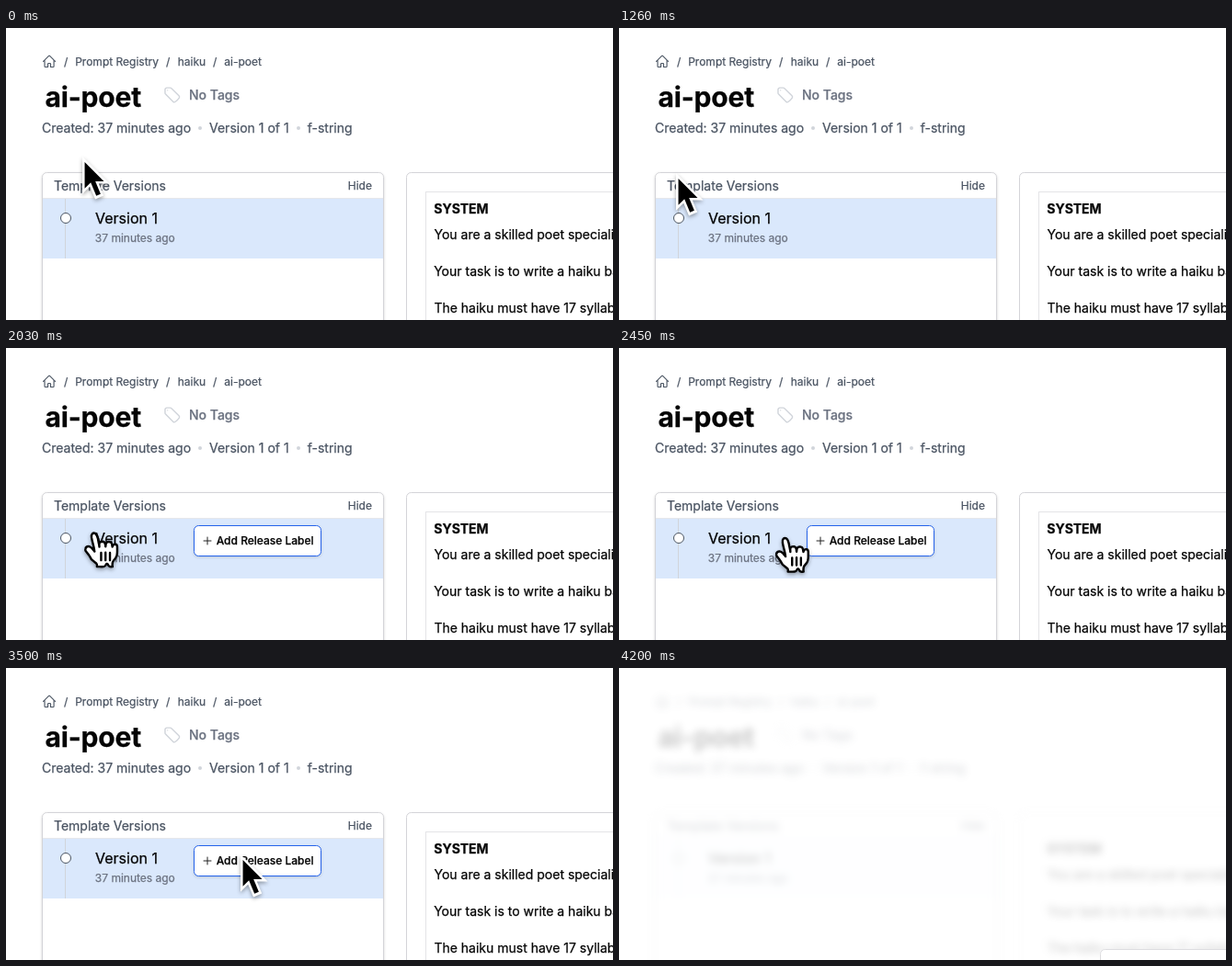
An HTML page for the animation above (4.41 s loop, 660 by 318 pixels).

```html
<!DOCTYPE html>
<html lang="en">
<head>
<meta charset="utf-8">
<title>Prompt Registry</title>
<style>
  html, body { margin: 0; width: 100%; height: 100%; overflow: hidden; background: #fff; }
  svg { display: block; width: 660px; height: 318px; font-family: Inter, sans-serif; }
  /* A hairline stroke gives the slightly heavier text rendering */
  text { white-space: pre; stroke-width: .25; }
  .small { font-size: 12px; fill: #4b5563; stroke: #4b5563; }
  .body { font-size: 14px; fill: #4b5563; stroke: #4b5563; }
  .muted { fill: #6b7280; stroke: #6b7280; }
  .dark { fill: #050505; stroke: #050505; }
  .medium { font-weight: 500; }
  .line { fill: none; stroke-linecap: round; stroke-linejoin: round; }
  .panel { fill: #fff; stroke: #d4d4d8; }
  .shadow { filter: drop-shadow(0 1px 1.5px rgb(0 0 0 / .16)); }
  #cursor { filter: drop-shadow(0 2px 2px rgb(0 0 0 / .35)); }
</style>
</head>
<body>
<svg viewBox="0 0 660 318">
  <g id="page">
    <path class="line" stroke="#4b5563" stroke-width="1.7" transform="translate(39 28.4) scale(.67)"
      d="M2.25 12l8.95-8.95c.44-.44 1.15-.44 1.6 0L21.75 12M4.5 9.75v10.1c0 .63.5 1.15 1.1 1.15h4.15v-4.9c0-.6.5-1.1 1.1-1.1h2.3c.6 0 1.1.5 1.1 1.1V21h4.1c.65 0 1.15-.5 1.15-1.1V9.75"/>
    <g class="small">
      <text x="63" y="41">/</text>
      <text x="75.2" y="41">Prompt Registry</text>
      <text x="174" y="41">/</text>
      <text x="186.7" y="41">haiku</text>
      <text x="225" y="41">/</text>
      <text x="237.3" y="41">ai-poet</text>
    </g>

    <text class="dark" x="42.6" y="86" font-size="30" font-weight="700" letter-spacing="-.2">ai-poet</text>
    <path class="line" stroke="#d1d5db" stroke-width="1.7" transform="translate(170.4 62.6) scale(.85)"
      d="M9.57 3H5.25A2.25 2.25 0 0 0 3 5.25v4.32c0 .6.24 1.17.66 1.59l9.58 9.58c.7.7 1.78.87 2.6.33a18 18 0 0 0 5.23-5.22c.54-.83.37-1.91-.33-2.61L11.16 3.66A2.25 2.25 0 0 0 9.57 3zM6.2 6.2h.01"/>
    <text class="muted medium" font-size="14" x="199" y="78">No Tags</text>

    <g class="body">
      <text x="39" y="114">Created: 37 minutes ago</text>
      <text x="221" y="114">Version 1 of 1</text>
      <text x="327.7" y="114">f-string</text>
    </g>
    <g fill="#d1d5db"><circle cx="211" cy="109" r="2"/><circle cx="318" cy="109" r="2"/></g>

    <rect class="panel shadow" x="39.5" y="157.5" width="371" height="180" rx="5"/>
    <path d="M40 185.5H410" stroke="#e5e7eb"/>
    <text class="body" x="52" y="177">Template Versions</text>
    <text class="small" x="371.8" y="176">Hide</text>
    <rect id="row" x="40" y="186" width="370" height="65" fill="#dae8fc"/>
    <path d="M64.5 186V251" stroke="#d1d5db"/>
    <circle cx="65" cy="207" r="5.5" fill="#fff" stroke="#4b5563"/>
    <text class="dark" x="97" y="213" font-size="16">Version 1</text>
    <text class="muted" font-size="12" x="96.8" y="233">37 minutes ago</text>

    <g id="button">
      <rect class="shadow" x="204.5" y="193.5" width="138" height="33" rx="5" fill="#fff" stroke="#2563eb"/>
      <path class="line" d="M215 210h8M219 206v8" stroke="#222"/>
      <text class="dark medium" font-size="12" x="228.7" y="214">Add Release Label</text>
    </g>

    <rect class="panel" x="435.5" y="157.5" width="260" height="200" rx="5"/>
    <rect x="456.5" y="178.5" width="240" height="180" fill="none" stroke="#e4e4e7"/>
    <g class="dark" font-size="14">
      <text x="465.3" y="202" font-weight="700">SYSTEM</text>
      <text x="465.5" y="230">You are a skilled poet specializing in haiku.</text>
      <text x="465.2" y="270">Your task is to write a haiku based on a topic.</text>
      <text x="465.4" y="310">The haiku must have 17 syllables in total.</text>
    </g>
  </g>

  <rect id="dialog" x="523.5" y="306.5" width="300" height="200" rx="5" fill="#fff" stroke="#dcdcdf"/>

  <g id="cursor">
    <g id="arrow" transform="scale(2.55) translate(-8.2 -4.9)">
      <path fill="#fff" d="M8.2 20.9V4.9L19.8 16.5H13l-.4.1zM17.3 21.6l-3.6 1.5L9 12l3.7-1.5z"/>
      <path d="M9.2 7.3v11.2l3-2.9.4-.1h4.8z"/>
      <path d="M11.05 14.25l1.85-.78 3.1 7.38-1.85.77z"/>
    </g>
    <g id="hand" transform="scale(2.4) translate(-12.3 -7.3)" class="line" stroke="#000" stroke-width="1">
      <path fill="#fff" d="M11.3 20.4c-.3-.4-.6-1.1-1.2-2-.3-.5-1.2-1.5-1.5-1.9-.2-.4-.2-.6-.1-1 .1-.6.7-1.1 1.4-1.1.5 0 1 .4 1.4.7.2.2.5.6.7.8l.4.5c.2.3.3.5.2.1-.1-.5-.2-1.3-.4-2.1l-.6-2.4c-.1-.3-.2-1.1-.3-1.5-.1-.5-.1-1.4.3-1.8.3-.3.9-.4 1.3-.2.5.3.8 1 .9 1.3.2.5.4 1.2.5 2 .2 1 .5 2.5.5 2.8 0-.4-.1-1.1 0-1.5.1-.3.3-.7.7-.8.3-.1.6-.1.9-.1.3.1.6.3.8.5.4.6.4 1.9.4 1.8.1-.4.1-1.2.3-1.6.1-.2.5-.4.7-.5.3-.1.7-.1 1 0 .2 0 .6.3.7.5.2.3.3 1.3.4 1.7 0 .1.1-.4.3-.7.4-.6 1.8-.8 1.9.6v2.3c0 .4-.1 1.3-.2 1.7-.1.3-.4 1-.7 1.4 0 0-1.1 1.2-1.2 1.8-.1.6-.1.6-.1 1s.1.9.1.9-.8.1-1.2 0-.9-.8-1-1.1c-.2-.3-.5-.3-.7 0-.2.4-.7 1.1-1.1 1.1-.7.1-2.1 0-3.1 0 0 0 .2-1-.2-1.4z"/>
      <path d="M15.6 17.3v3.4M17.6 17.2v3.5M19.6 17.3v3.4"/>
    </g>
  </g>
</svg>
<script>
const LOOP = 4410, STEP = 70, LAST = 4200;
const $ = id => document.getElementById(id);
const show = (id, on) => $(id).style.display = on ? "" : "none";

// Pointer path: time, x, y
const path = [
  [0, 83, 140], [350, 64, 134], [700, 42, 123], [840, 42, 123],
  [1260, 62, 158], [1750, 90, 196], [2030, 95.5, 199],
  [2400, 170, 204], [2800, 246, 206], [3500, 255, 203],
  [3640, 255, 204], [4130, 257, 315], [4200, 258, 345]
];

const slope = (i, k) => {
  const a = path[Math.max(i - 1, 0)], b = path[Math.min(i + 1, path.length - 1)];
  return (b[k] - a[k]) / (b[0] - a[0]);
};

// Cubic Hermite interpolation through the path points
function pointerAt(t) {
  let i = 0;
  while (i < path.length - 2 && t >= path[i + 1][0]) i++;
  const a = path[i], b = path[i + 1], d = b[0] - a[0], u = (t - a[0]) / d, v = 1 - u;
  return [1, 2].map(k =>
    v * v * (1 + 2 * u) * a[k] + u * v * v * d * slope(i, k) +
    u * u * (3 - 2 * u) * b[k] - u * u * v * d * slope(i + 1, k));
}

function draw(t) {
  const overlay = Math.min(Math.max((t - 3530) / 210, 0), 1);
  const hovering = t >= 1470 && t < 3430;
  $("page").style.opacity = 1 - 0.8 * overlay;
  $("page").style.filter = overlay ? `blur(${4 * overlay}px)` : "none";
  $("row").style.opacity = 1 - 0.8 * overlay;
  $("dialog").style.opacity = overlay;
  show("button", t >= 1470 && t < 3600);
  show("hand", hovering);
  show("arrow", !hovering);
  $("cursor").setAttribute("transform", `translate(${pointerAt(t)})`);
}

const start = performance.now();
function tick() {
  const t = (performance.now() - start) % LOOP;
  draw(Math.min(Math.floor(t / STEP) * STEP, LAST));
  requestAnimationFrame(tick);
}
tick();
</script>
</body>
</html>
```
